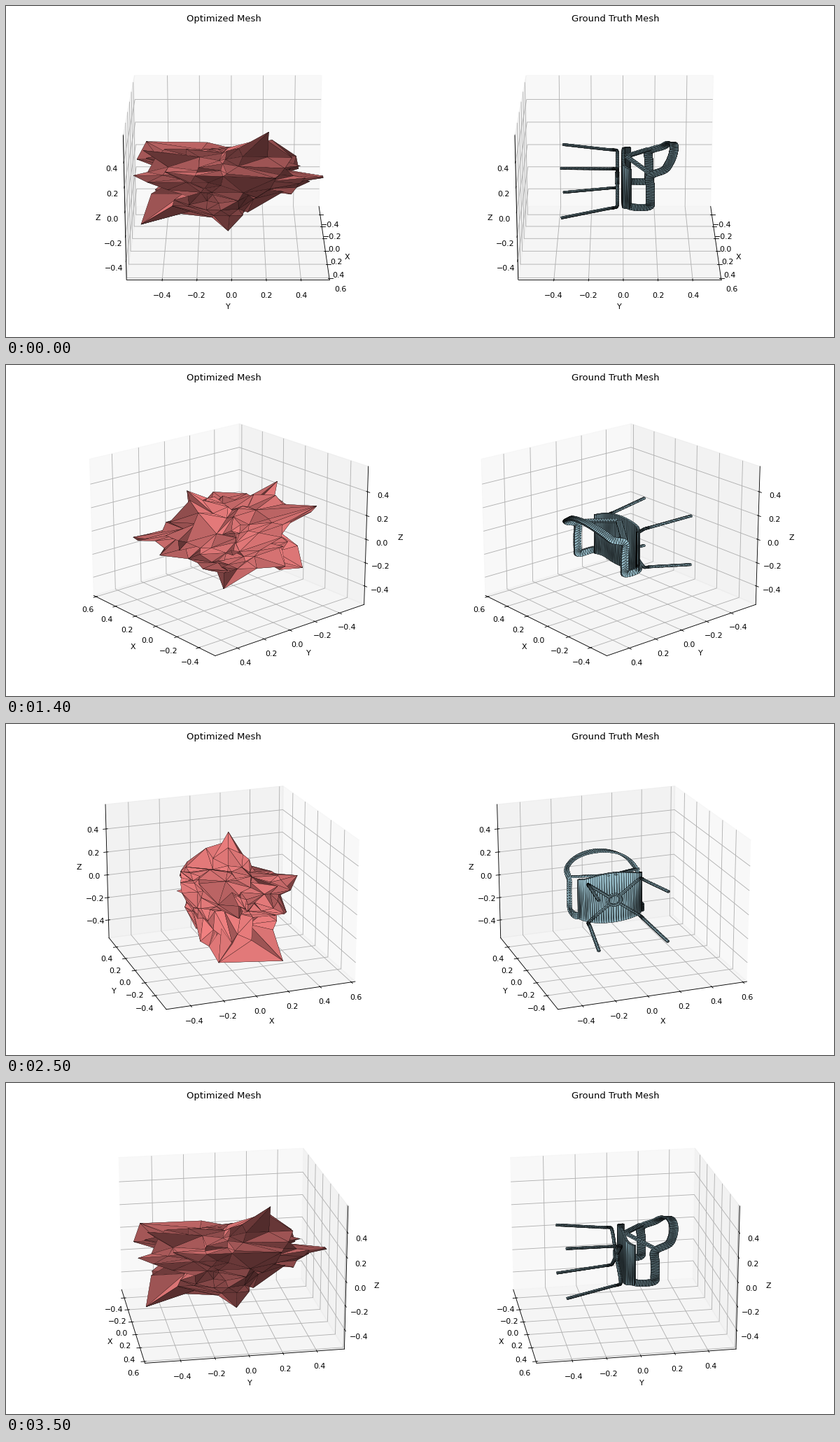
A matplotlib script that plays this animation: 1183x473 px, repeating every 3.6 s.

```python
import numpy as np
import matplotlib.pyplot as plt
from matplotlib.animation import FuncAnimation
from matplotlib.tri import Triangulation
from mpl_toolkits.mplot3d.art3d import Poly3DCollection

WIDTH, HEIGHT, DPI = 1183, 473, 78.87
FRAMES, INTERVAL = 36, 100
BOX_CENTER = np.array([0.0393, -0.0208, 0.0244])
BOX_HALF = 0.5854


def unit(v):
    return v / np.linalg.norm(v, axis=-1, keepdims=True)


def smooth(points, n):
    """Cubic Hermite curve through the points, n samples."""
    p = np.array(points, float)
    m = np.gradient(p, axis=0)
    t = np.linspace(0, len(p) - 1, n)
    i = np.minimum(t.astype(int), len(p) - 2)
    u = (t - i)[:, None]
    return ((2*u**3 - 3*u**2 + 1) * p[i] + (u**3 - 2*u**2 + u) * m[i]
            + (3*u**2 - 2*u**3) * p[i + 1] + (u**3 - u**2) * m[i + 1])


def sweep(path, normal, width, depth, sides=4):
    """Triangles of a bar with a polygonal section along a path."""
    tangent = unit(np.gradient(path, axis=0))
    normal = np.broadcast_to(np.array(normal, float), path.shape)
    normal = unit(normal - (normal * tangent).sum(1, keepdims=True) * tangent)
    across = np.cross(tangent, normal)
    width = np.broadcast_to(width, len(path))[:, None, None]
    a = 2 * np.pi * (np.arange(sides) + 0.5) / sides
    r = 0.5 / np.cos(np.pi / sides)
    ring = path[:, None] + r * (
        np.cos(a)[None, :, None] * width * across[:, None]
        + np.sin(a)[None, :, None] * depth * normal[:, None])
    p, q = ring[:-1], ring[1:]
    p2, q2 = np.roll(p, -1, axis=1), np.roll(q, -1, axis=1)
    return np.concatenate([np.stack([p, q, p2], 2),
                           np.stack([p2, q, q2], 2)]).reshape(-1, 3, 3)


def seat():
    u = np.sin(np.linspace(-np.pi / 2, np.pi / 2, 40))
    path = np.column_stack([0.2 * u, 0.045 * u**8, 0 * u - 0.03])
    curl = np.column_stack([-1.8 * u**7, 0 * u + 1, 0 * u])
    return sweep(path, curl, 0.42 - 0.09 * u**2, 0.014)


def arms_and_rail():
    foot = [(0.19, 0.01, -0.16), (0.22, 0.06, -0.172), (0.22, 0.15, -0.17),
            (0.22, 0.16, -0.12), (0.22, 0.16, 0)]
    a = np.linspace(0, np.pi / 2, 6)
    h = np.sin(a)
    arc = np.column_stack([0.22 * np.cos(a), 0.16 + 0.145 * np.sqrt(h),
                           0.09 + 0.145 * h])
    half = np.vstack([foot, arc])
    path = smooth(np.vstack([half * (-1, 1, 1), half[-2::-1]]), 110)
    outward = path * (3, 0, 1)
    outward[:, 2] = np.maximum(outward[:, 2], 0)
    return sweep(path, outward, 0.05, 0.012)


def strut(sx):
    path = np.linspace((sx * 0.01, 0.025, 0.15), (sx * 0.22, 0.16, 0.11), 16)
    return sweep(path, (0, 0.3, 1), 0.034, 0.012)


def leg(sx, sz):
    """A spoke under the seat that bends down into a splayed leg."""
    spread = np.array([0.2, 0.9, 1, 1.03, 1.27])
    y = np.array([-0.035, -0.035, -0.055, -0.1, -0.37])
    path = np.column_stack([sx * 0.17 * spread, y,
                            sz * 0.165 * spread - 0.035 + 0.06 * y])
    return sweep(smooth(path, 36), (sz, 0, -sx), 0.017, 0.017, 6)


def hub():
    a = np.linspace(0, 2 * np.pi, 25)
    path = np.column_stack([0.042 * np.cos(a), 0 * a - 0.035,
                            0.045 * np.sin(a) - 0.035])
    return sweep(path, (0, 1, 0), 0.018, 0.018, 5)


def chair_mesh():
    signs = (-1, 1)
    return np.concatenate(
        [seat(), arms_and_rail(), hub()] + [strut(sx) for sx in signs]
        + [leg(sx, sz) for sx in signs for sz in signs])


# the longest spikes, relative to the centre of the box
TIPS = np.array([
    (0.14, -0.56, 0.05), (0.2, 0.56, 0.06), (0.15, -0.52, -0.36),
    (0.12, -0.5, 0.25), (-0.24, -0.5, 0.16), (0.09, 0.24, 0.39),
    (0.37, -0.19, 0.16), (-0.21, -0.42, -0.36), (0.29, 0, -0.34),
    (-0.15, 0.16, -0.37)])


def spiky_mesh(fillers=210):
    rng = np.random.default_rng(11)
    axes = np.array([0.26, 0.43, 0.23])
    center = np.array([0, 0, -0.03])

    tips = (TIPS - center) / axes
    tip_radius = np.linalg.norm(tips, axis=1)
    tip_dirs = unit(tips)

    # boxy ragged body, drawn out near the spikes
    dirs = np.vstack([unit(rng.normal(size=(fillers, 3))), [0, 0, 1]])
    n = len(dirs)
    radius = (dirs**4).sum(1)**-0.25 * rng.uniform(0.72, 1.03, n)
    cosine = dirs @ tip_dirs.T
    near = cosine.argmax(1)
    angle = np.arccos(np.clip(cosine.max(1), -1, 1))
    pull = 0.8 * rng.random(n) * np.exp(-(angle / 0.4)**2)
    radius += pull * (tip_radius[near] - radius)

    # ragged along y, and cut away under the positive end
    body = dirs * radius[:, None] * axes
    body[:, 1] *= rng.uniform(0.65, 1.2, n)
    body[:, 1] *= 1 - 1.8 * np.clip(-body[:, 2], 0, 0.3) * (body[:, 1] > 0)
    verts = np.vstack([TIPS, body + center])
    dirs = np.vstack([tip_dirs, dirs])

    # Delaunay on the sphere by stereographic projection from the last vertex
    flat = dirs[:-1, :2] / (1 - dirs[:-1, 2:])
    tri = Triangulation(flat[:, 0], flat[:, 1])
    t, i = np.nonzero(tri.neighbors < 0)
    start, stop = tri.triangles[t, i], tri.triangles[t, (i + 1) % 3]
    cap = np.column_stack([stop, start, np.full(len(t), len(flat))])
    faces = verts[np.vstack([tri.triangles, cap])]

    normals = np.cross(faces[:, 1] - faces[:, 0], faces[:, 2] - faces[:, 0])
    inward = (normals * (faces.mean(1) - center)).sum(1) < 0
    faces[inward] = faces[inward, ::-1]
    return faces + BOX_CENTER


def add_panel(left, title, faces, color, linewidth):
    side = 432.5
    ax = fig.add_axes([left / WIDTH, 11.7 / HEIGHT, side / WIDTH, side / HEIGHT],
                      projection="3d")
    ax.add_collection3d(Poly3DCollection(
        faces, facecolors=color, edgecolors="black",
        linewidths=linewidth, shade=True))
    ticks = np.arange(-2, 4) / 5
    low, high = BOX_CENTER - BOX_HALF, BOX_CENTER + BOX_HALF
    ax.set(xlabel="X", ylabel="Y", zlabel="Z",
           xticks=ticks, yticks=ticks[:-1], zticks=ticks[:-1])
    ax.set(xlim=(low[0], high[0]), ylim=(low[1], high[1]),
           zlim=(low[2], high[2]))
    ax.set_title(title).set_y(1)
    return ax


# the small surplus keeps the pixel size from being truncated
fig = plt.figure(figsize=((WIDTH + 0.01) / DPI, (HEIGHT + 0.01) / DPI), dpi=DPI)
panels = [
    add_panel(95.1, "Optimized Mesh", spiky_mesh(), "lightcoral", 0.2),
    add_panel(654.7, "Ground Truth Mesh", chair_mesh(), "lightblue", 0.25),
]


def update(frame):
    for ax in panels:
        ax.view_init(elev=20, azim=frame * 360 / FRAMES)
    return panels


anim = FuncAnimation(fig, update, frames=FRAMES, interval=INTERVAL,
                     repeat=True, repeat_delay=0, blit=False)
plt.show()
```
